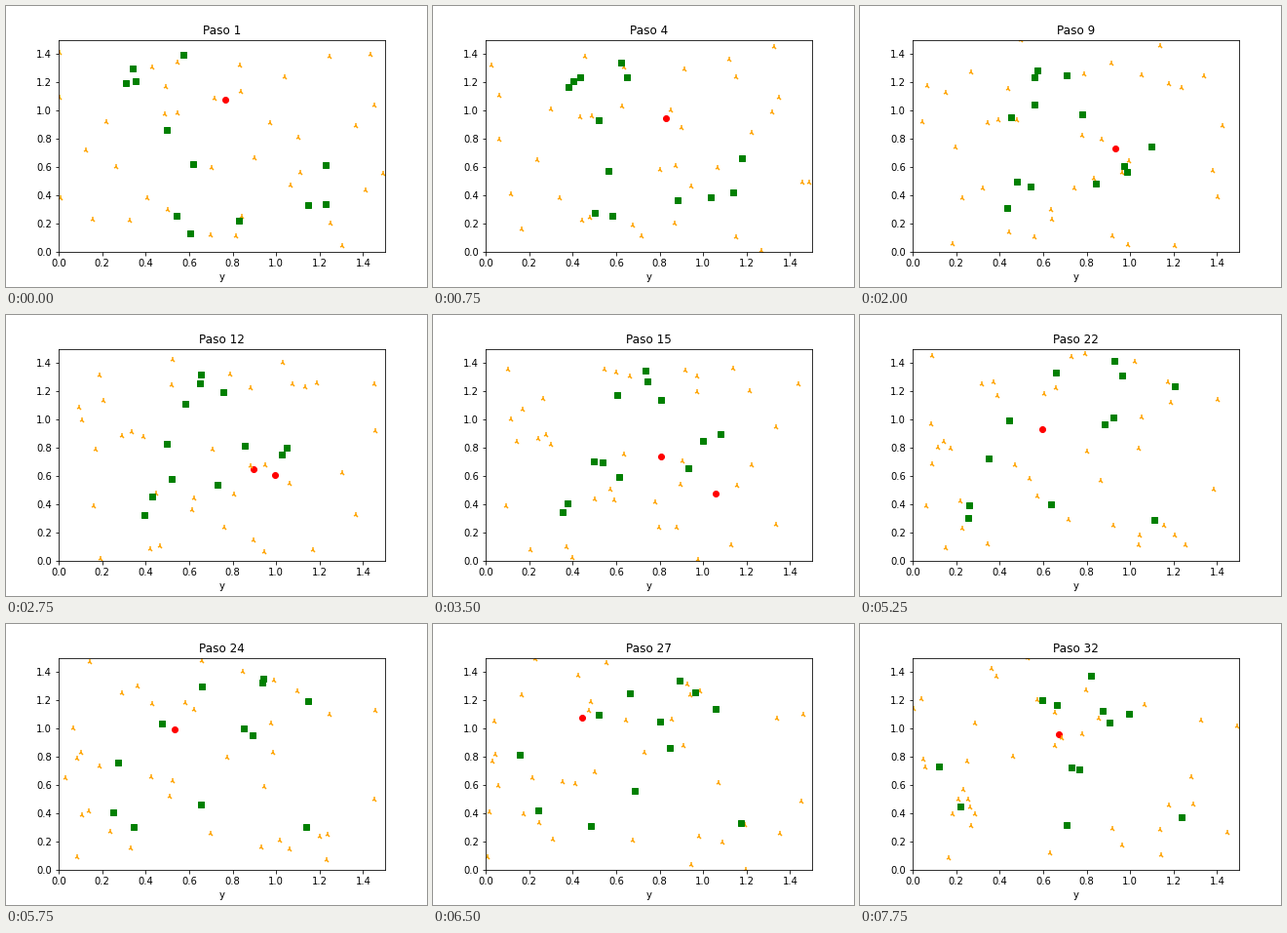
A matplotlib script that plays this animation: 432x288 px, repeating every 8000 ms.

```python
import numpy as np
import matplotlib.pyplot as plt
from matplotlib.animation import FuncAnimation

STEPS = 32
SIDE = 1.5                      # width and height of the box, in data units
LEFT, BOTTOM = 54, 252          # axes corner on the stage, in pixels
SCALE_X, SCALE_Y = 223.2, 144.96  # pixels per data unit
INFECTED, RECOVERED = 11, 18    # steps at which a ball changes state


def path(turn, *points):
    """Straight flight from the first point to a bounce at step turn, then on to the last."""
    x, y = np.array(points, float).T
    steps = np.arange(1, STEPS + 1)
    keys = [1, turn, STEPS]
    return np.column_stack([
        np.interp(steps, keys, (x - LEFT) / SCALE_X),
        np.interp(steps, keys, (BOTTOM - y) / SCALE_Y),
    ])


def drift(start, heading, speed):
    """Uniform motion reflected by the walls of the box."""
    steps = np.arange(STEPS)[:, None]
    free = start + steps * speed * np.array([np.cos(heading), np.sin(heading)])
    return SIDE - np.abs(free % (2 * SIDE) - SIDE)


first_sick = path(22, (225, 96), (323, 226), (317, 186))
second_sick = path(27, (328, 203), (153, 96), (203.5, 112.5))

healthy = [
    path(22, (182, 50), (260, 105), (225, 149)),
    path(22, (182, 50), (302, 210), (330, 198)),
    path(22, (130, 64), (196, 194), (217, 147)),
    path(22, (123, 79), (269, 62), (237, 53)),
    path(22, (133, 77), (261, 47), (276, 92)),
    path(22, (165, 127), (201, 59), (202, 83)),
    path(22, (192, 162), (111, 208), (212, 206)),
    path(22, (175, 215), (112, 195), (103, 187)),
    path(22, (189, 233), (153, 108), (187, 78)),
    path(22, (239, 220), (323, 73), (256, 101)),
    path(27, (310, 204), (89, 134), (81, 146)),
    path(27, (328, 163), (233, 100), (249, 89)),
]

# immune balls start on a jittered grid and drift in random directions
rng = np.random.default_rng(7)
GRID = 6
immune = [
    drift((np.array([col, row]) + rng.random(2)) * SIDE / GRID,
          rng.uniform(0, 2 * np.pi), rng.uniform(0.015, 0.045))
    for row in range(GRID) for col in range(GRID)
]

fig, ax = plt.subplots(figsize=(6, 4), dpi=72)
fig.subplots_adjust(left=0.125, right=0.9, bottom=0.125, top=0.88)
ax.set_xlim(0, SIDE)
ax.set_ylim(0, SIDE)
ax.set_xlabel("y")
title = ax.set_title("Paso 1")

red, = ax.plot([], [], "o", color="red")
orange, = ax.plot([], [], "2", color="orange", markeredgewidth=1.5)
green, = ax.plot([], [], "s", color="green")


def draw(i):
    step = i + 1
    sick, safe, well = [], list(immune), list(healthy)
    (sick if step < RECOVERED else safe).append(first_sick)
    (well if step < INFECTED else sick).append(second_sick)
    for line, balls in [(red, sick), (orange, safe), (green, well)]:
        line.set_data(*np.array([ball[i] for ball in balls]).T)
    title.set_text(f"Paso {step}")
    return red, orange, green, title


anim = FuncAnimation(fig, draw, frames=STEPS, interval=250, repeat=True, repeat_delay=0)
plt.show()
```
